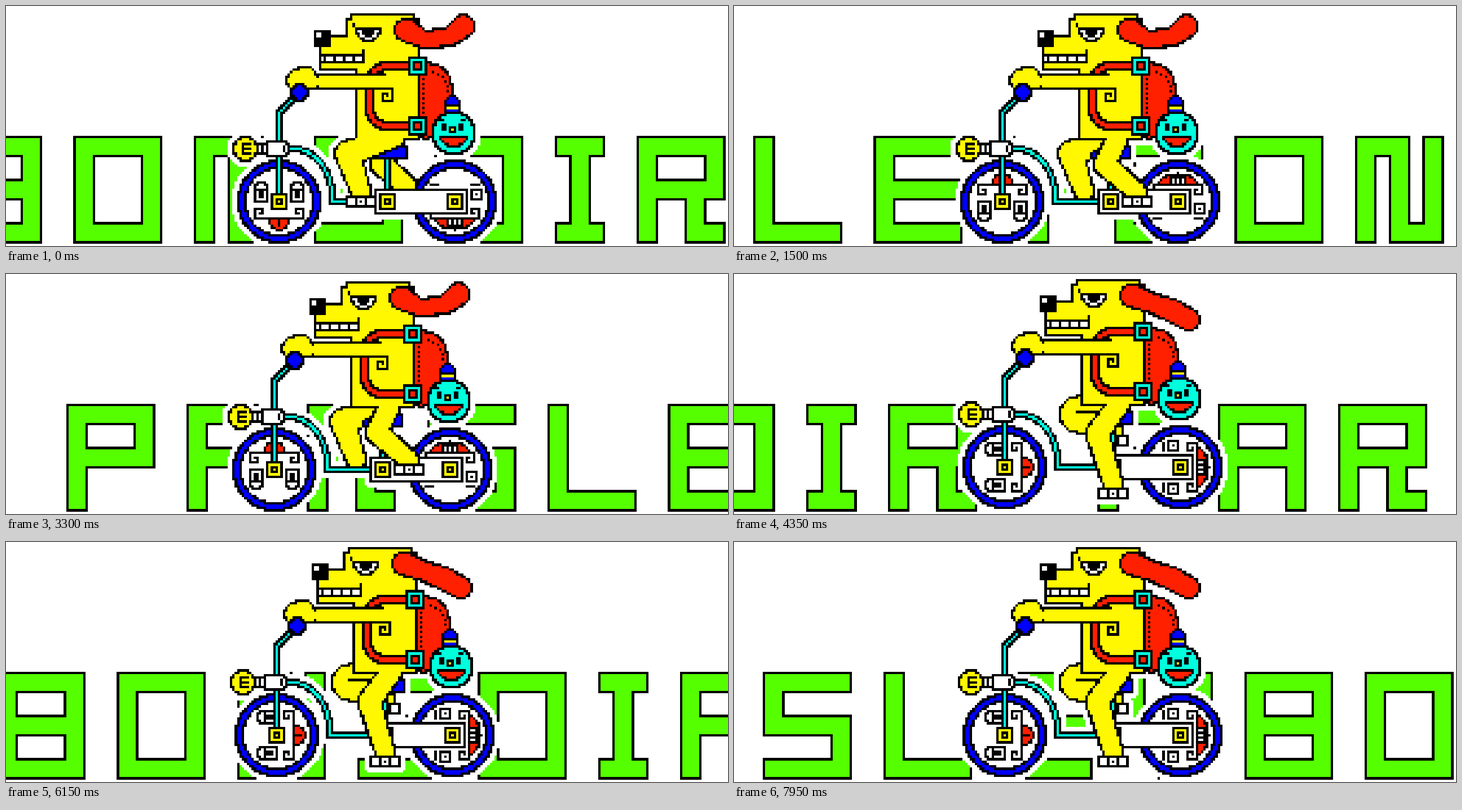
An HTML page with a canvas that plays this animation: 1280 px wide and 427 px high, repeating every 8000 ms.

```html
<!DOCTYPE html>
<html lang="en">
<head>
<meta charset="utf-8">
<title>Dog on a bike</title>
<style>
html, body { margin: 0; width: 100%; height: 100%; overflow: hidden; background: #fff; }
canvas { display: block; width: 100vw; height: 100vh; image-rendering: pixelated; }
</style>
</head>
<body>
<canvas id="stage" width="300" height="100"></canvas>
<script>
const W = 300, H = 100, STEP = 150, LOOP = 8000;
const INK = '#000', WHITE = '#fff', YELLOW = '#fff800', RED = '#ff2000',
      BLUE = '#00f', CYAN = '#00ffdd', GREEN = '#5f0';

function layer() {
  const c = document.createElement('canvas');
  c.width = W; c.height = H;
  return c.getContext('2d');
}
const stage = document.getElementById('stage').getContext('2d');
const sprite = layer(), mask = layer();
let g = stage;

// ---- pixel helpers: integer coordinates name whole pixels ----
function rect(x0, y0, x1, y1, color = INK) {
  g.fillStyle = color;
  g.fillRect(x0, y0, x1 - x0 + 1, y1 - y0 + 1);
}

const dot = (x, y, color) => rect(x, y, x, y, color);

function box(x0, y0, x1, y1, fill) {
  rect(x0, y0, x1, y1);
  rect(x0 + 1, y0 + 1, x1 - 1, y1 - 1, fill);
}

function ellipse(cx, cy, rx, ry, color, top = cy - ry) {
  for (let y = Math.ceil(top); y <= cy + ry; y++) {
    const half = rx * Math.sqrt(1 - ((y - cy) / ry) ** 2);
    rect(Math.ceil(cx - half), y, Math.floor(cx + half), y, color);
  }
}

const disc = (cx, cy, r, color) => ellipse(cx, cy, r, r, color);

function ring(cx, cy, r, fill) {
  disc(cx, cy, r, INK);
  disc(cx, cy, r - 1.2, fill);
}

// Lower half of an ellipse: eyes, tongues and grins.
function bowl(cx, cy, rx, ry, fill) {
  ellipse(cx, cy, rx, ry, INK, cy);
  ellipse(cx, cy, rx - 1.1, ry - 1.1, fill, cy + 1);
}

// Round stroke through [x, y, radius] points.
function limb(path, grow, color) {
  for (let i = 0; i + 1 < path.length; i++) {
    const [ax, ay, ar = .5] = path[i], [bx, by, br = .5] = path[i + 1];
    const dx = bx - ax, dy = by - ay, len = dx * dx + dy * dy || 1;
    const pad = Math.max(ar, br) + grow;
    for (let y = Math.ceil(Math.min(ay, by) - pad); y <= Math.max(ay, by) + pad; y++)
      for (let x = Math.ceil(Math.min(ax, bx) - pad); x <= Math.max(ax, bx) + pad; x++) {
        const t = Math.min(1, Math.max(0, ((x - ax) * dx + (y - ay) * dy) / len));
        const d = Math.hypot(x - ax - t * dx, y - ay - t * dy);
        if (d <= ar + (br - ar) * t + grow) dot(x, y, color);
      }
  }
}

// Outlines several parts as one shape; a part is a rectangle or a limb.
function union(parts, color) {
  for (const inset of [0, 1])
    for (const p of parts) {
      const paint = inset ? color : INK;
      if (Array.isArray(p[0])) limb(p, 1.1 * (1 - inset), paint);
      else rect(p[0] + inset, p[1] + inset, p[2] - inset, p[3] - inset, paint);
    }
}

const tube = (...path) => union([path], CYAN);

function arc(cx, cy, rx, ry, from, to, n = 8) {
  return Array.from({ length: n + 1 }, (_, i) => {
    const a = (from + (to - from) * i / n) * Math.PI / 180;
    return [cx + rx * Math.cos(a), cy + ry * Math.sin(a)];
  });
}

// Square spiral with arms of n, n-1, ... 1 pixels.
function spiral(x, y, dx, dy, n, hand) {
  for (; n > 0; n--) {
    for (let k = 0; k < n; k++) dot(x += dx, y += dy);
    [dx, dy] = [-dy * hand, dx * hand];
  }
}

// ---- scrolling lettering built from shared bars ----
const BARS = {
  t: [0, 0, 36, 8], m: [0, 18, 36, 26], b: [0, 36, 36, 44],
  l: [0, 0, 8, 26], L: [0, 18, 8, 44], r: [28, 0, 36, 26], R: [28, 18, 36, 44],
  k: [20, 18, 28, 44], f: [20, 36, 36, 44], y: [14, 18, 22, 44],
  n: [0, 0, 22, 8], d: [14, 0, 22, 44], u: [14, 36, 36, 44],
  i: [6, 0, 14, 44], s: [0, 0, 20, 8], z: [0, 36, 20, 44]
};
const GLYPHS = {
  B: 'tmblLrR', O: 'tblLrR', N: 'lLndurR', S: 'tlmRb', I: 'siz', R: 'tmlLrkf',
  P: 'tmlLr', A: 'tmlLrR', L: 'lLb', E: 'tmblL', Y: 'lrmy', ' ': ''
};
const TEXT = 'BONSOIR PARSLEY', TEXT_WIDTH = 721;
const advance = ch => ch === 'I' ? 34 : ch === ' ' ? 37 : 50;

function lettering(x) {
  for (const ch of TEXT) {
    const bars = [...GLYPHS[ch]].map(k => BARS[k].map((v, i) => v + (i % 2 ? 54 : x)));
    if (x > -50 && x < W) union(bars, GREEN);
    x += advance(ch);
  }
}

// ---- wheels ----
function whiskers() {
  rect(-10, 7, 10, 7);
  for (const s of [-1, 1]) spiral(10 * s, 7, 0, -1, 4, -s);
}

function frontFace() {
  for (const x of [-10, 5]) {
    union([[x, -7, x + 5, 0], [x + 1, -8, x + 4, 0]], WHITE);
    rect(x + 1, -5, x + 4, -5);
    rect(x + 2, -4, x + 3, -2);
  }
  bowl(0, 7, 4.5, 5.5, RED);
  rect(0, 8, 0, 10);
  whiskers();
}

function rearFace() {
  for (const s of [-1, 1]) {
    box(9 * s - 2, -5, 9 * s + 2, -1, WHITE);
    dot(9 * s, -3);
    rect(8.5 * s - 1.5, -7, 8.5 * s + 1.5, -7);
  }
  bowl(0, 7, 8.5, 5, RED);
  box(-3, 7, 3, 10, WHITE);
  for (const x of [-1, 1]) rect(x, 8, x, 9);
  whiskers();
}

function wheel(cx, cy, turn, face) {
  ring(cx, cy, 17.6, BLUE);
  ring(cx, cy, 14.7, WHITE);
  const c = [1, 0, -1, 0][turn], s = [0, 1, 0, -1][turn];
  g.save();
  g.transform(c, -s, s, c, cx + .5, cy + .5);
  g.translate(-.5, -.5);
  face();
  g.restore();
}

function hub(cx, cy) {
  box(cx - 3, cy - 3, cx + 3, cy + 3, YELLOW);
  box(cx - 1, cy - 1, cx + 1, cy + 1, YELLOW);
}

function bike(turn) {
  wheel(186, 81, turn, rearFace);
  wheel(113, 81, turn, frontFace);
  tube([158, 63], [158, 77]);
  tube([117, 59], ...arc(119, 79, 16, 20, -90, 0), [135, 81], [155, 81]);
  box(153, 76, 191, 86, WHITE);
  hub(158, 81);
  hub(186, 81);
  tube([113, 62], [113, 79]);
  hub(113, 81);
  union([[[151, 61.5, .7], [163, 60.5, 2]], [161, 58, 166, 63]], BLUE);
  tube([120, 37], [113, 44], [113, 57]);
  box(104, 57, 108, 61, WHITE);
  rect(106, 58, 106, 60);
  union([[108, 56, 116, 62], [108, 57, 117, 61]], WHITE);
  rect(115, 58, 115, 60);
  ring(99, 59, 5.6, YELLOW);
  rect(98, 57, 98, 61);
  for (const y of [57, 59, 61]) rect(98, y, 101, y);
}

// ---- legs: hip to knee to pedal, the far one half a turn behind ----
const HIP = [161, 54, 4];
const KNEES = [[141.5, 61, 4.8], [151.5, 67, 4.3], [155.5, 65.5, 4.2], [143.5, 59, 7]];

const pedal = turn => [158 + 11 * [-1, 0, 1, 0][turn], 81 + 11 * [0, 1, 0, -1][turn]];

function leg(turn) {
  const [x, y] = pedal(turn);
  return [HIP, KNEES[turn], [x, y - 4, 3.6]];
}

function foot(turn) {
  const [x, y] = pedal(turn);
  box(x - 6, y - 2, x + 6, y + 2, WHITE);
  for (const s of [-2, 2]) rect(x + s, y - 2, x + s, y + 2);
  dot(x, y);
}

function farLeg(turn) {
  const far = (turn + 2) % 4;
  union([leg(far)], YELLOW);
  if (far === 3) rect(143, 58, 163, 58);
  if (turn % 2) foot(far);
}

// ---- dog and luggage ----
function backpack() {
  union([[[175, 33, 9], [175, 40, 9], [174, 48, 6]]], RED);
  for (let y = 28; y <= 46; y += 2) dot(173, y);
  for (const [x, y] of arc(174, 35, 9, 9, -70, 0, 5)) dot(Math.round(x), Math.round(y));
}

function body(turn) {
  const head = [[141, 5, 171, 25], [143, 3, 169, 25]];
  const snout = [130, 12, 150, 20], jaw = [130, 23, 150, 26], torso = [145, 20, 171, 55];
  union([...head, snout, jaw, torso, leg(turn)], YELLOW);
  if (turn === 3) rect(143, 58, 163, 58);
  foot(turn);

  rect(130, 20, 148, 23);
  rect(131, 21, 147, 22, WHITE);
  for (let x = 132; x < 148; x += 4) rect(x, 21, x, 22);
  rect(148, 18, 148, 23);
  rect(128, 10, 134, 16);
  rect(129, 11, 130, 12, WHITE);
  bowl(150, 9, 5.5, 5.4, WHITE);
  ellipse(150, 9, 2.6, 3.6, INK, 10);
  rect(144, 7, 144, 8);
}

function strap() {
  const path = [[167, 24.5], ...arc(158, 32, 7.5, 7.5, -90, -180),
                ...arc(158, 42, 7.5, 7.5, 180, 90), [167, 49.5]];
  union([path.map(p => [...p, 1])], RED);
}

function arm() {
  const hand = [[121, 30.5, 4.2], [124, 29.5, 4.2]];
  union([hand, [124, 28, 160, 34]], YELLOW);
  rect(158, 28, 163, 33, YELLOW);
  spiral(160, 34, 0, 1, 5, 1);
  dot(129, 29); dot(129, 33);
  ring(121.5, 35.5, 4.1, BLUE);
}

function buckle(y) {
  box(167, y, 174, y + 7, CYAN);
  box(169, y + 2, 172, y + 5, RED);
}

function bauble() {
  union([[[185, 40, 2.3], [185, 43, 2.3]]], BLUE);
  rect(183, 41, 187, 41);
  rect(183, 42, 187, 42, YELLOW);
  ring(185.5, 52.5, 9.4, CYAN);
  for (const s of [-1, 1]) {
    const x = 185 + 3.5 * s;
    rect(x - .5, 49, x + .5, 51);
    rect(x - .5 + s, 47, x + .5 + s, 47);
  }
  box(184, 50, 186, 52, YELLOW);
  bowl(185.5, 54, 5.8, 4.6, RED);
}

const EARS = [
  [[166, 9.5, 4.3], [173, 13.5, 3], [184, 12.5, 3.2], [189.5, 8, 4.2]],
  [[166, 9.5, 4.3], [174, 12.5, 3.6], [183, 16, 4.2], [189.5, 19.5, 4]]
];

function rider(turn) {
  g = sprite;
  g.clearRect(0, 0, W, H);
  g.save();
  g.translate([0, -1, -2, -1][turn], -(turn % 2));
  farLeg(turn);
  bike(turn);
  backpack();
  body(turn);
  strap();
  arm();
  buckle(21);
  buckle(46);
  bauble();
  union([EARS[turn % 2]], RED);
  g.restore();
  g = stage;
}

// White silhouette spread around the rider keeps it clear of the lettering.
function halo() {
  mask.globalCompositeOperation = 'copy';
  mask.drawImage(sprite.canvas, 0, 0);
  mask.globalCompositeOperation = 'source-in';
  mask.fillStyle = WHITE;
  mask.fillRect(0, 0, W, H);
  for (let y = -2; y <= 2; y++)
    for (let x = -2; x <= 2; x++)
      if (x * x + y * y <= 5) stage.drawImage(mask.canvas, x, y);
}

function draw(step) {
  rect(0, 0, W - 1, H - 1, WHITE);
  const x = -22 + 18 * ((step + 18) % 40 - 18);
  for (const k of [-1, 0, 1]) lettering(x + k * TEXT_WIDTH);
  rider(step % 4);
  halo();
  stage.drawImage(sprite.canvas, 0, 0);
}

let shown = -1;
function tick() {
  const step = Math.floor(performance.now() % LOOP / STEP);
  if (step !== shown) draw(shown = step);
  requestAnimationFrame(tick);
}
tick();
</script>
</body>
</html>
```
